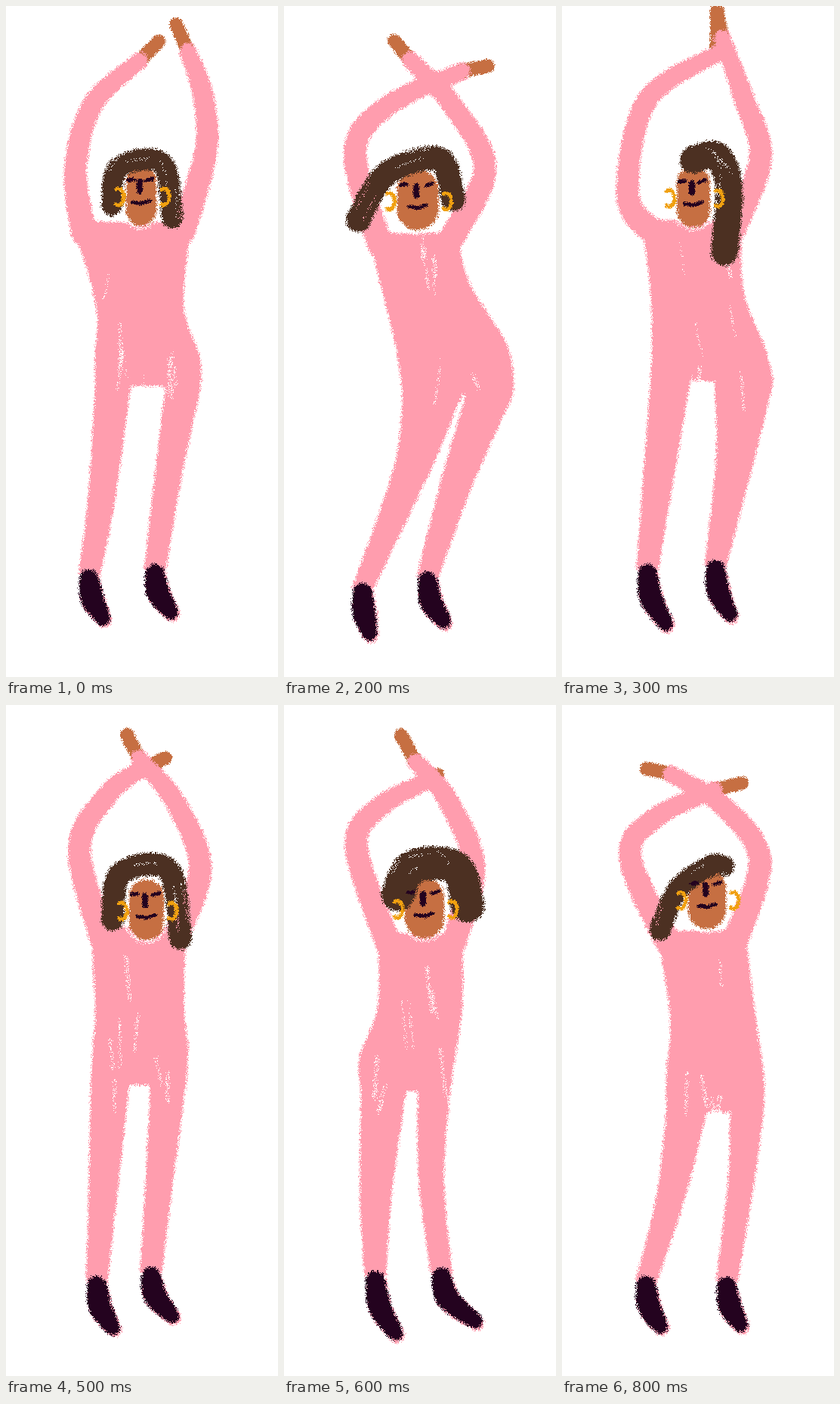
Recreate the animation shown at these times as an HTML page with a canvas. Size 360 by 886 pixels, loop 900 ms.

```html
<!DOCTYPE html>
<html lang="en">
<head>
<meta charset="utf-8">
<title>Dancer</title>
<style>
html, body { margin: 0; width: 100%; height: 100%; overflow: hidden; background: #fff; }
canvas { display: block; }
</style>
</head>
<body>
<canvas id="stage" width="360" height="886"></canvas>
<script>
const W = 360, H = 886, STEP = 100;
const PINK = [255, 157, 174], SKIN = [198, 111, 66], HAIR = [76, 48, 34],
      GOLD = [240, 160, 16], INK = [36, 3, 31];
const ARM_WIDTHS = [34, 30, 27, 22], SHOE_WIDTHS = [24, 30, 20], ANKLE = 29, HAND = 18;

// arm: elbow, forearm, wrist, fingertips. leg: knee, ankle, toe.
// torso: [y, left, right] from shoulders to crotch. face: [x, y, width].
const armsUp = {
  armL: [[92, 215], [115, 130], [177, 72], [202, 47]],
  armR: [[265, 190], [260, 115], [241, 60], [225, 24]],
  torso: [[285, 88, 246], [395, 119, 235], [460, 118, 256], [502, 118, 258]],
  crotch: [165, 211],
  legL: [[126, 655], [110, 752], [128, 808]],
  legR: [[214, 625], [197, 745], [218, 800]],
  face: [179, 250, 40],
  hair: [[140, 263], [150, 213], [207, 208], [220, 280]], hairWidth: 28
};
const hipRight = {
  armL: [[94, 192], [140, 130], [236, 86], [270, 79]],
  armR: [[266, 215], [222, 130], [167, 71], [146, 46]],
  torso: [[300, 112, 230], [365, 127, 245], [450, 148, 296], [512, 157, 304]],
  crotch: [236, 241],
  legL: [[171, 608], [104, 770], [113, 828]],
  legR: [[227, 635], [190, 755], [211, 812]],
  face: [177, 256, 55],
  hair: [[98, 283], [135, 222], [205, 202], [224, 255]], hairWidth: 32
};
const handsJoined = {
  armL: [[87, 250], [112, 125], [205, 63], [205, 5]],
  armR: [[263, 200], [240, 120], [212, 42], [205, 5]],
  torso: [[283, 105, 238], [375, 117, 240], [450, 119, 268], [495, 117, 280]],
  crotch: [170, 202],
  legL: [[125, 645], [113, 745], [137, 815]],
  legR: [[229, 600], [203, 740], [222, 803]],
  face: [174, 252, 44],
  hair: [[174, 203], [205, 198], [221, 240], [215, 325]], hairWidth: 36
};
const upright = {
  armL: [[97, 188], [137, 116], [180, 84], [211, 70]],
  armR: [[257, 215], [225, 130], [176, 70], [160, 39]],
  torso: [[292, 112, 238], [400, 118, 236], [450, 115, 241], [502, 112, 238]],
  crotch: [163, 191],
  legL: [[128, 650], [120, 762], [141, 822]],
  legR: [[202, 640], [192, 750], [219, 806]],
  face: [186, 270, 46],
  hair: [[141, 283], [152, 222], [215, 218], [231, 308]], hairWidth: 30
};
const hipLeft = {
  armL: [[94, 185], [118, 152], [200, 116], [196, 114]],
  armR: [[245, 210], [205, 115], [173, 80], [150, 41]],
  torso: [[310, 135, 235], [395, 130, 236], [480, 85, 212], [518, 92, 202]],
  crotch: [160, 163],
  legL: [[115, 650], [122, 748], [154, 836]],
  legR: [[188, 612], [225, 752], [286, 820]],
  face: [186, 266, 58],
  hair: [[160, 218], [190, 205], [240, 212], [255, 222]], hairWidth: 58
};
const wristsCrossed = {
  armL: [[90, 200], [125, 148], [202, 112], [238, 103]],
  armR: [[262, 205], [215, 135], [144, 91], [112, 84]],
  torso: [[298, 125, 242], [410, 143, 256], [490, 138, 267], [538, 138, 267]],
  crotch: [191, 222],
  legL: [[144, 650], [111, 762], [130, 820]],
  legR: [[237, 630], [218, 763], [236, 818]],
  face: [192, 256, 50],
  hair: [[130, 297], [152, 245], [195, 213], [214, 213]], hairWidth: 28
};

function mix(a, b, t = 0.5) {
  if (typeof a === "number") return a + (b - a) * t;
  if (Array.isArray(a)) return a.map((v, i) => mix(v, b[i], t));
  return Object.fromEntries(Object.keys(a).map(k => [k, mix(a[k], b[k], t)]));
}

const poses = [
  armsUp, mix(armsUp, hipRight), hipRight,
  handsJoined, mix(handsJoined, upright), upright,
  mix(upright, hipLeft), hipLeft, wristsCrossed
];

function newContext() {
  return Object.assign(document.createElement("canvas"), { width: W, height: H })
    .getContext("2d", { willReadFrequently: true });
}
const shape = newContext(), mask = newContext();
shape.lineCap = shape.lineJoin = "round";

// Catmull-Rom curve through points of any dimension.
function smooth(points, steps = 10) {
  const at = i => points[Math.max(0, Math.min(points.length - 1, i))];
  const curve = [];
  for (let i = 0; i < points.length - 1; i++) {
    const [a, b, c, d] = [at(i - 1), at(i), at(i + 1), at(i + 2)];
    for (let s = 0; s < steps; s++) {
      const t = s / steps;
      curve.push(b.map((v, k) => v + t / 2 * (c[k] - a[k]
        + t * (2 * a[k] - 5 * v + 4 * c[k] - d[k] + t * (3 * (v - c[k]) + d[k] - a[k])))));
    }
  }
  return [...curve, at(points.length - 1)];
}

function line(width, ...points) {
  shape.lineWidth = width;
  shape.beginPath();
  points.forEach(p => shape.lineTo(p[0], p[1]));
  shape.stroke();
}

function limb(points, widths) {
  const curve = smooth(points.map((p, i) => [...p, widths[i]]));
  curve.slice(1).forEach((p, i) => line(p[2], curve[i], p));
}

function slab(rows) {
  const curve = smooth(rows);
  shape.beginPath();
  curve.forEach(([y, left]) => shape.lineTo(left, y));
  curve.reverse().forEach(([y, , right]) => shape.lineTo(right, y));
  shape.fill();
}

function leg([knee, ankle], [y, left, right]) {
  const row = ([x, y], width) => [y, x - width / 2, x + width / 2];
  slab([[y, left, right], row(knee, (right - left + ANKLE) * 0.47), row(ankle, ANKLE)]);
}

function shoe([, ankle, toe]) {
  const top = [ankle[0], ankle[1] + 4];
  const heel = [mix(top[0], toe[0], 0.2), mix(top[1], toe[1])];
  limb([top, heel, toe], SHOE_WIDTHS);
}

function thin(draw) {
  shape.globalCompositeOperation = "destination-out";
  shape.globalAlpha = 0.5;
  draw();
  shape.globalAlpha = 1;
  shape.globalCompositeOperation = "source-over";
}

function drawBody({ torso, crotch, armL, armR, legL, legR, face }, random) {
  const [top, left, right] = torso[0], [hipY, hipL, hipR] = torso[3];
  slab(torso);
  leg(legL, [hipY, hipL, crotch[0]]);
  leg(legR, [hipY, crotch[1], hipR]);
  limb([[left + 15, top + 15], ...armL.slice(0, 3)], ARM_WIDTHS);
  limb([[right - 12, top + 12], ...armR.slice(0, 3)], ARM_WIDTHS);
  shape.translate(2, 3);
  [legL, legR].forEach(shoe);
  shape.resetTransform();
  thin(() => {
    drawFace(face, 12);
    const rows = smooth(torso);
    for (let i = 0; i < 7; i++) {
      const [y, l, r] = rows[Math.floor(random() * rows.length)];
      const x = mix(l, r, 0.15 + 0.7 * random());
      line(2 + 4 * random(), [x, y], [x - 10 + 20 * random(), y + 20 + 50 * random()]);
    }
  });
}

function drawFace([x, y, width], margin = 0) {
  const reach = (80 - width) / 2;
  line(width + margin, [x, y - reach], [x, y + reach]);
}

function drawHair({ hair, hairWidth }, random) {
  const curve = smooth(hair);
  line(hairWidth, ...curve);
  thin(() => {
    for (let i = 0; i < 5; i++) {
      const start = Math.floor(random() * (curve.length - 6));
      const shift = (random() - 0.5) * hairWidth;
      line(3, ...curve.slice(start, start + 6).map(([x, y]) => [x + shift, y + shift]));
    }
  });
}

function drawEarrings([x, y, width]) {
  for (const side of [-1, 1]) {
    shape.lineWidth = 5;
    shape.beginPath();
    shape.ellipse(x + side * (width / 2 + 10), y + 2, 7, 11, 0, -2.1 * side, 2.1 * side, side < 0);
    shape.stroke();
  }
}

function drawFeatures([x, y, width]) {
  const noseX = x - 2, noseY = y - 12, eye = width * 0.3;
  line(8, [noseX, noseY - 6], [noseX, noseY + 6]);
  line(5, [noseX - eye - 4, noseY - 8], [noseX - eye + 4, noseY - 9]);
  line(5, [noseX + eye - 4, noseY - 7], [noseX + eye + 5, noseY - 10]);
  line(5, [x - 12, y + 9], [x, y + 11], [x + 11, y + 7]);
}

function randomFrom(seed) {
  return () => (seed = (seed * 1664525 + 1013904223) >>> 0) / 4294967296;
}

// A soft mask cut by random thresholds gives the grainy crayon edge.
function crayon(picture, random, color, softness, draw) {
  shape.clearRect(0, 0, W, H);
  draw();
  mask.clearRect(0, 0, W, H);
  mask.filter = `blur(${softness}px)`;
  mask.drawImage(shape.canvas, 0, 0);
  const { data } = mask.getImageData(0, 0, W, H);
  for (let i = 0; i < data.length; i += 4) {
    if (data[i + 3] && data[i + 3] / 255 > 0.12 + 0.76 * random()) picture.data.set(color, i);
  }
}

function paint(pose, index) {
  const picture = new ImageData(W, H);
  picture.data.fill(255);
  const random = randomFrom(index * 7919 + 1);
  const layer = (...args) => crayon(picture, random, ...args);
  layer(SKIN, 1.8, () => [pose.armL, pose.armR].forEach(arm => line(HAND, arm[2], arm[3])));
  layer(PINK, 2.2, () => drawBody(pose, random));
  layer(SKIN, 2, () => drawFace(pose.face));
  layer(HAIR, 2.2, () => drawHair(pose, random));
  layer(GOLD, 1, () => drawEarrings(pose.face));
  layer(INK, 1, () => drawFeatures(pose.face));
  layer(INK, 2.2, () => [pose.legL, pose.legR].forEach(shoe));
  return picture;
}

const pictures = poses.map(paint);
const stage = document.getElementById("stage").getContext("2d");
let shown = -1;

function play() {
  const index = Math.floor(performance.now() / STEP) % pictures.length;
  if (index !== shown) stage.putImageData(pictures[shown = index], 0, 0);
  requestAnimationFrame(play);
}
play();
</script>
</body>
</html>
```
